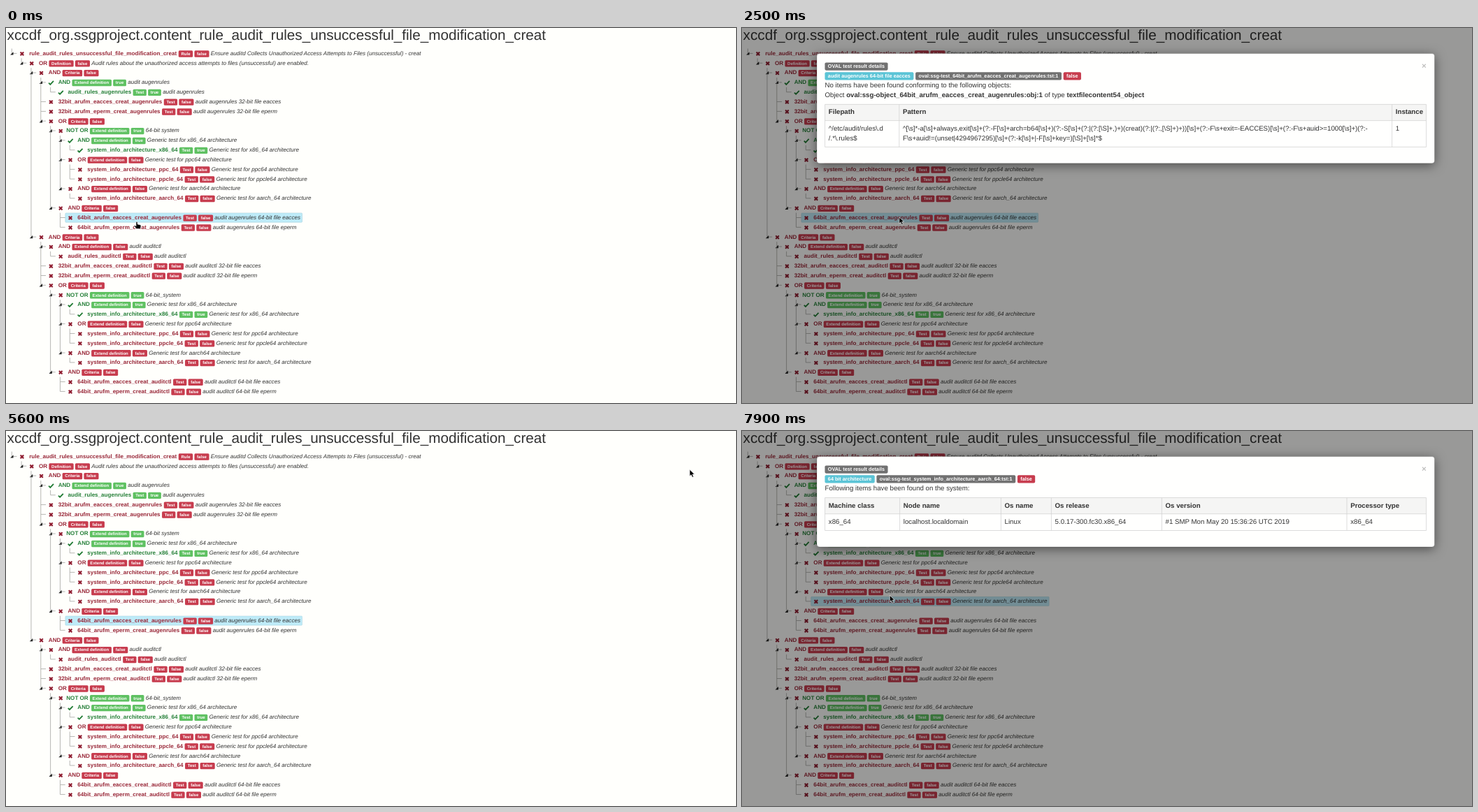
These frames come from a looping animation (1044x537 px, 8000 ms). An HTML page:

```html
<!DOCTYPE html>
<html lang="en">
<head>
<meta charset="utf-8">
<title>Rule result tree</title>
<style>
html, body { margin: 0; width: 100%; height: 100%; overflow: hidden; background: #fffffc; }
svg { display: block; width: 1044px; height: 537px; }
text { font-family: "Liberation Sans", Arial, sans-serif; text-rendering: geometricPrecision; white-space: pre; }
</style>
</head>
<body>
<svg id="stage" viewBox="0 0 1044 537" xmlns="http://www.w3.org/2000/svg"></svg>
<script>
const stage = document.getElementById('stage');
const pen = document.createElement('canvas').getContext('2d');
const LOOP = 8000, UNIT = 13.83, TREE = 8.09, BODY = 9.68;
const RED = '#992839', GREEN = '#27803a', INK = '#333';
const FILL = { red: '#c73c4e', green: '#5fc162', gray: '#717171', cyan: '#5bc4d6' };

function add(parent, tag, attrs, content) {
  const el = document.createElementNS('http://www.w3.org/2000/svg', tag);
  for (const k in attrs) el.setAttribute(k, attrs[k]);
  if (content !== undefined) el.textContent = content;
  parent.appendChild(el);
  return el;
}

function width(str, size, style = '') {
  pen.font = `${style} 100px "Liberation Sans", Arial, sans-serif`;
  return pen.measureText(str).width * size / 100;
}

// Each writer returns the x where its content ends.
function write(parent, x, y, str, size, style = '', fill = INK) {
  const attrs = { x, y, 'font-size': size, fill };
  if (style === 'bold') attrs['font-weight'] = 'bold';
  if (style === 'italic') attrs['font-style'] = 'italic';
  add(parent, 'text', attrs, str);
  return x + width(str, size, style);
}

function badge(parent, x, y, str, base, color) {
  const size = base * 0.75, pad = size * 0.6;
  const w = width(str, size, 'bold') + 2 * pad;
  add(parent, 'rect', { x, y: y - 1.06 * size, width: w, height: 1.54 * size, rx: size * 0.25, fill: FILL[color] });
  write(parent, x + pad, y, str, size, 'bold', '#fff');
  return x + w;
}

// Tree rows: depth, name, kind, result, note
const rows = [];
const row = (depth, name, kind, ok, note = '') => rows.push({ depth, name, kind, ok, note });

function branch(tool, system) {
  const on = tool === 'augenrules';
  row(2, 'AND', 'Criteria', false);
  row(3, 'AND', 'Extend definition', on, 'audit ' + tool);
  row(4, 'audit_rules_' + tool, 'Test', on, 'audit ' + tool);
  const file = (depth, bits, err) =>
    row(depth, `${bits}bit_arufm_${err}_creat_${tool}`, 'Test', false, `audit ${tool} ${bits}-bit file ${err}`);
  const arch = (depth, name, kind, ok, cpu) => row(depth, name, kind, ok, `Generic test for ${cpu} architecture`);
  file(3, 32, 'eacces');
  file(3, 32, 'eperm');
  row(3, 'OR', 'Criteria', false);
  row(4, 'NOT OR', 'Extend definition', true, system);
  arch(5, 'AND', 'Extend definition', true, 'x86_64');
  arch(6, 'system_info_architecture_x86_64', 'Test', true, 'x86_64');
  arch(5, 'OR', 'Extend definition', false, 'ppc64');
  arch(6, 'system_info_architecture_ppc_64', 'Test', false, 'ppc64');
  arch(6, 'system_info_architecture_ppcle_64', 'Test', false, 'ppcle64');
  arch(5, 'AND', 'Extend definition', false, 'aarch64');
  arch(6, 'system_info_architecture_aarch_64', 'Test', false, 'aarch_64');
  row(4, 'AND', 'Criteria', false);
  file(5, 64, 'eacces');
  file(5, 64, 'eperm');
}

const RULE = 'rule_audit_rules_unsuccessful_file_modification_creat';
row(0, RULE, 'Rule', false,
  'Ensure auditd Collects Unauthorized Access Attempts to Files (unsuccessful) - creat');
row(1, 'OR', 'Definition', false,
  'Audit rules about the unauthorized access attempts to files (unsuccessful) are enabled.');
branch('augenrules', '64-bit system');
branch('auditctl', '64-bit_system');

const rowBox = { height: 13.2, rx: 1, 'stroke-width': 0.5 };
const hoverBox = add(stage, 'rect', { ...rowBox, fill: '#e7f4f8', stroke: '#dde8ea' });
const pickBox = add(stage, 'rect', { ...rowBox, fill: '#beebf8', stroke: '#a9d3de' });
const tree = add(stage, 'g', {});
write(tree, 1.6, 17.1, 'xccdf_org.ssgproject.content_' + RULE, 20.7);

function drawRow(r, i) {
  const mid = 36.4 + UNIT * i, base = mid + 2.4;
  const shift = UNIT * r.depth, rail = 8.3 + shift, gap = TREE * 0.278;

  let j = i - 1;
  while (j >= 0 && rows[j].depth > r.depth) j--;
  const top = j >= 0 && rows[j].depth === r.depth ? 36.4 + UNIT * j : mid - 6.9;
  add(tree, 'path', { d: `M${rail} ${top}V${mid}H${rail + 7.2}`, fill: 'none', stroke: '#999996', 'stroke-width': 0.7 });
  if (rows[i + 1] && rows[i + 1].depth > r.depth)
    add(tree, 'path', { d: `M${rail + 2.2} ${mid - 2.2}v4.4h-4.4z`, fill: '#222' });

  const negated = r.name.startsWith('NOT ');
  const icon = r.ok && !negated;
  add(tree, 'path', {
    d: icon ? 'M-3.3 .3L-1.1 2.5L3.6-2.4' : 'M-2.3-2.3L2.3 2.3M2.3-2.3L-2.3 2.3',
    transform: `translate(${22.9 + shift} ${mid + 0.5})`,
    fill: 'none', stroke: icon ? '#1f7a32' : '#8f1d30', 'stroke-width': icon ? 1.8 : 2.1
  });

  const tone = r.ok ? 'green' : 'red';
  let x = 33.2 + shift - (negated ? gap : 0);
  x = write(tree, x, base, r.name, TREE, 'bold', r.ok ? GREEN : RED) + gap;
  x = badge(tree, x, base, r.kind, TREE, tone) + gap;
  x = badge(tree, x, base, String(r.ok), TREE, tone);
  if (r.note) x = write(tree, x + gap, base, r.note, TREE, 'italic');
  r.x0 = 15.7 + shift;
  r.x1 = x + 2.4;
  r.y0 = mid - 6.5;
}
rows.forEach(drawRow);

// Dialogs
const shade = add(stage, 'rect', { width: 1044, height: 537, fill: '#000', opacity: 0.4 });

function dialog(bottom, title, id) {
  const g = add(stage, 'g', {});
  add(g, 'rect', {
    x: 107, y: 36.6, width: 883.5, height: bottom - 36.6, rx: 4, fill: '#fffffe',
    stroke: 'rgba(0,0,0,.25)', 'stroke-width': 0.7, style: 'filter:drop-shadow(0 3.5px 8px rgba(0,0,0,.5))'
  });
  badge(g, 118.5, 57.2, 'OVAL test result details', BODY, 'gray');
  let x = badge(g, 118.5, 71.05, title, BODY, 'cyan') + 2.7;
  x = badge(g, x, 71.05, id, BODY, 'gray') + 2.7;
  badge(g, x, 71.05, 'false', BODY, 'red');
  g.cross = add(g, 'text', {
    x: 975.3, y: 58, 'font-size': 11.5, 'font-weight': 'bold', 'text-anchor': 'middle', fill: '#000', opacity: 0.25
  }, '×');
  return g;
}

function table(g, edges, top, head, bottom, titles, cells) {
  const left = edges[0], right = edges[edges.length - 1];
  add(g, 'rect', { x: left, y: top, width: right - left, height: head - top, fill: '#f5f5f4' });
  const lines = [top, head, bottom].map(y => `M${left} ${y}H${right}`)
    .concat(edges.map(x => `M${x} ${top}V${bottom}`)).join('');
  add(g, 'path', { d: lines, stroke: '#d4d4d3', 'stroke-width': 0.8 });
  titles.forEach((title, i) => {
    const x = edges[i] + 5.2;
    write(g, x, top + 14, title, BODY, 'bold');
    cells[i].forEach((line, k) => write(g, x, head + 14.7 + UNIT * k, line, BODY));
  });
}

const fileDialog = dialog(193.8, 'audit augenrules 64-bit file eacces',
  'oval:ssg-test_64bit_arufm_eacces_creat_augenrules:tst:1');
write(fileDialog, 118.5, 84.8, 'No items have been found conforming to the following objects:', BODY);
let end = write(fileDialog, 118.5, 98.6, 'Object ', BODY);
end = write(fileDialog, end, 98.6, 'oval:ssg-object_64bit_arufm_eacces_creat_augenrules:obj:1', BODY, 'bold');
end = write(fileDialog, end, 98.6, ' of type ', BODY);
write(fileDialog, end, 98.6, 'textfilecontent54_object', BODY, 'bold');
table(fileDialog, [118.6, 224.8, 929.6, 978.6], 109.4, 132.6, 170.4, ['Filepath', 'Pattern', 'Instance'], [
  ['^/etc/audit/rules\\.d', '/.*\\.rules$'],
  [String.raw`^[\s]*-a[\s]+always,exit[\s]+(?:-F[\s]+arch=b64[\s]+)(?:-S[\s]+(?:|(?:[\S]+,)+)(creat)(?:|(?:,[\S]+)+))[\s]+(?:-F\s+exit=-EACCES)[\s]+(?:-F\s+auid>=1000[\s]+)(?:-`,
   String.raw`F\s+auid!=(unset|4294967295)[\s]+(?:-k[\s]+|-F[\s]+key=)[\S]+[\s]*$`],
  ['1']
]);

const archDialog = dialog(166, '64 bit architecture', 'oval:ssg-test_system_info_architecture_aarch_64:tst:1');
write(archDialog, 118.5, 84.8, 'Following items have been found on the system:', BODY);
table(archDialog, [118.6, 225.6, 370.4, 442.4, 600.4, 865, 978.6], 95.5, 118.7, 142.5,
  ['Machine class', 'Node name', 'Os name', 'Os release', 'Os version', 'Processor type'],
  [['x86_64'], ['localhost.localdomain'], ['Linux'], ['5.0.17-300.fc30.x86_64'],
   ['#1 SMP Mon May 20 15:36:26 UTC 2019'], ['x86_64']]);

// Pointer
const pointer = add(stage, 'path', { fill: '#000', stroke: '#fff', 'stroke-width': 0.6, 'stroke-linejoin': 'round' });
const ARROW = 'M0 0V9.3L2.1 7.4L3.8 11L5.5 10.2L3.9 6.8L6.8 6.6Z';
const HAND = 'M-1 .9Q0-.5 1 .9L1.2 4L5.2 5Q6.2 5.3 6 6.6L5.3 10.6H-.4L-3.6 6.7Q-3.5 5.2-2.2 5.8L-1 6.9Z';

const path = [
  [0, 187, 277], [300, 190, 286], [600, 195, 298], [900, 205, 288], [1000, 208, 286],
  [1400, 223.5, 271.5], [1500, 223.5, 271.5], [1600, 224.8, 270.8], [3900, 224.8, 270.8],
  [4000, 244.5, 274], [4100, 244.5, 274], [4200, 262, 278], [4500, 520, 190], [4800, 930, 62],
  [4900, 967.5, 50.5], [5000, 967.5, 50.5], [5100, 974.8, 50.6], [5300, 974.8, 50.6],
  [5400, 977.8, 55.3], [5800, 977.8, 55.3], [5900, 974.5, 58.8], [6000, 974.5, 58.8],
  [6100, 726.5, 159], [6200, 726.5, 159], [6300, 600, 200], [6500, 340, 243], [6700, 205, 252],
  [6900, 129.3, 243.6], [7100, 129.3, 243.6], [7600, 132.5, 243], [7700, 132.5, 243],
  [7800, 170, 239], [7900, 211.3, 235.3]
];

function pointerAt(t) {
  const i = path.findIndex(p => p[0] > t);
  if (i < 0) return path[path.length - 1].slice(1);
  const [t0, x0, y0] = path[i - 1], [t1, x1, y1] = path[i];
  const k = (t - t0) / (t1 - t0);
  return [x0 + (x1 - x0) * k, y0 + (y1 - y0) * k];
}

const show = (el, on) => el.setAttribute('display', on ? 'inline' : 'none');

function mark(box, r) {
  show(box, !!r);
  if (!r) return;
  box.setAttribute('x', r.x0);
  box.setAttribute('y', r.y0);
  box.setAttribute('width', r.x1 - r.x0);
}

function render(ms) {
  const t = Math.floor(ms % LOOP / 100) * 100;
  const [x, y] = pointerAt(t);
  const first = t >= 2500 && t < 5600, second = t >= 7300;
  const open = first || second;
  const over = open ? null : rows.find(r => x >= r.x0 && x <= r.x1 && y >= r.y0 && y < r.y0 + UNIT);
  const onCross = first && x > 970 && y > 52 && y < 62;
  mark(hoverBox, over);
  mark(pickBox, rows[t < 7200 ? 17 : 15]);
  show(shade, open);
  show(fileDialog, first);
  show(archDialog, second);
  fileDialog.cross.setAttribute('opacity', onCross ? 0.55 : 0.25);
  pointer.setAttribute('d', (over && t !== 2400) || onCross ? HAND : ARROW);
  pointer.setAttribute('transform', `translate(${x} ${y})`);
}

const start = performance.now();
function tick() {
  render(performance.now() - start);
  requestAnimationFrame(tick);
}
tick();
</script>
</body>
</html>
```
